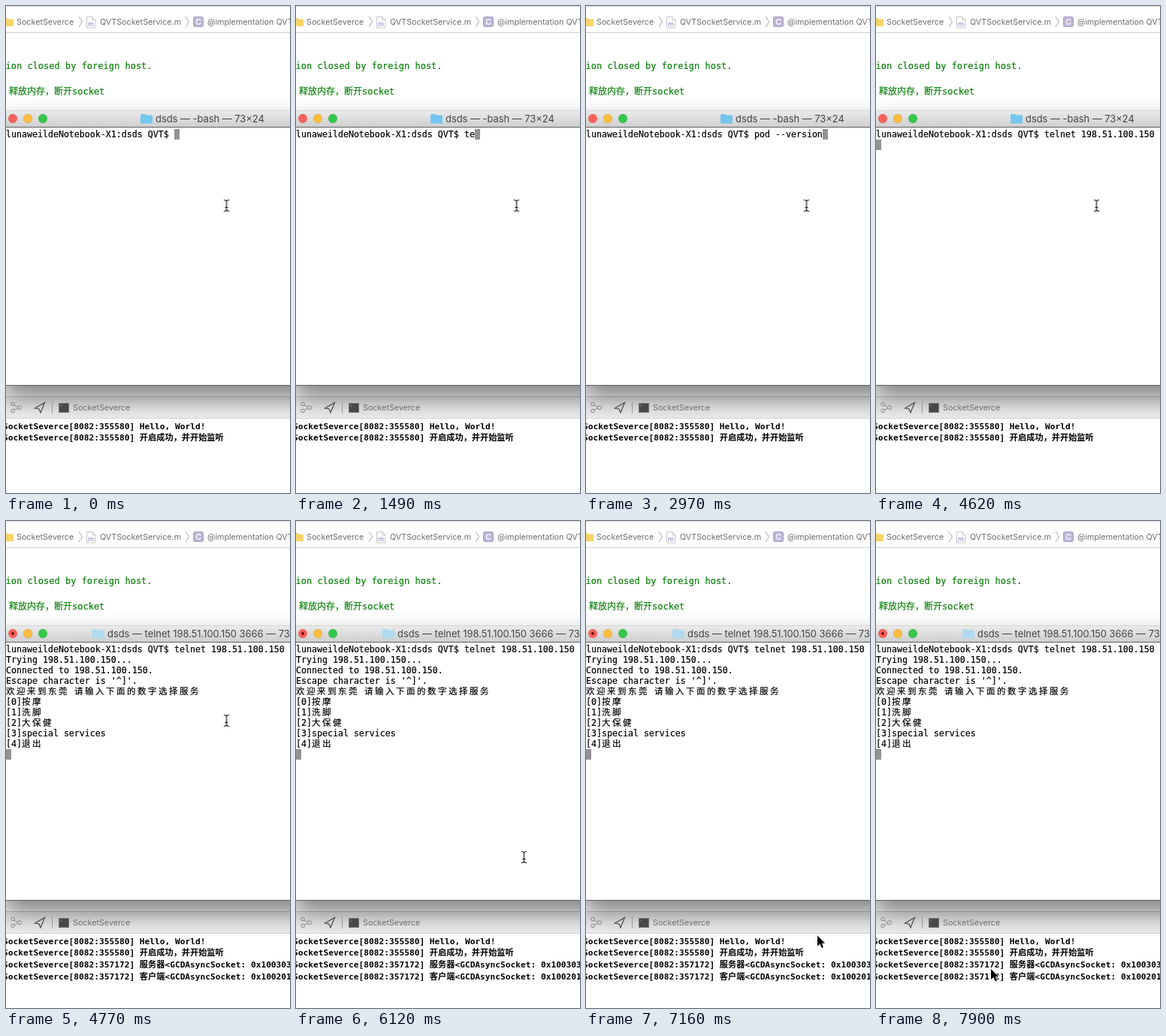
Write an HTML page that moves like this. It is 378 px wide and 649 px high and loops after 8000 ms.

```html
<!DOCTYPE html>
<html lang="zh-CN">
<head>
<meta charset="utf-8">
<title>Socket session</title>
<style>
html, body { margin: 0; width: 100%; height: 100%; overflow: hidden; background: #fff; }
svg { display: block; width: 378px; height: 649px; overflow: hidden; }
text { white-space: pre; }
.ui { font: 10.75px Inter, sans-serif; fill: #6e6e6e; }
.title { font: 12.9px Inter, sans-serif; fill: #444; }
.note { font: 12px "DejaVu Sans Mono", "Noto Sans CJK SC", monospace; fill: #0b800b; stroke: #0b800b; stroke-width: .2px; }
.log { font: bold 11.2px "DejaVu Sans Mono", "Noto Sans CJK SC", monospace; }
.term { font: 11.627px "DejaVu Sans Mono", monospace; stroke: #000; stroke-width: .2px; }
/* wide glyphs fill two 7px cells */
.zh { font: 11.5px "Noto Sans CJK SC", sans-serif; letter-spacing: 2.5px; }

.a { animation: 8s step-end infinite; }
.t { animation-name: t; }
.e { animation-name: e; }
.l { animation-name: l; }
.pod { animation-name: pod; }
.long { animation-name: long; }
.telnet { animation-name: telnet; }
.before { animation-name: before; }
.after { animation-name: after; }
.cursor { animation-name: cursor; }
.pointer { animation-name: pointer; }
.beam { animation-name: beam; }
.arrow { animation-name: arrow; }

@keyframes t { 0%, 22.375%, 100% { opacity: 0 } 9.375% { opacity: 1 } }
@keyframes e { 0%, 20.5%, 100% { opacity: 0 } 11.25% { opacity: 1 } }
@keyframes l { 0%, 18.625%, 100% { opacity: 0 } 13.125% { opacity: 1 } }
@keyframes long { 0%, 33.375%, 100% { opacity: 0 } 29.75% { opacity: 1 } }
@keyframes pod { 0%, 46.5%, 100% { opacity: 0 } 37.125% { opacity: 1 } }
@keyframes telnet {
  0%, 29.75%, 37.125% { opacity: 0 }
  27.875%, 33.375%, 46.5%, 100% { opacity: 1 }
}
@keyframes before { 0% { opacity: 1 } 59.625%, 100% { opacity: 0 } }
@keyframes after { 0% { opacity: 0 } 59.625%, 100% { opacity: 1 } }
@keyframes cursor {
  0%, 22.375% { transform: translate(224px, 164px) }
  9.375%, 20.5% { transform: translate(231px, 164px) }
  11.25%, 18.625% { transform: translate(238px, 164px) }
  13.125% { transform: translate(245px, 164px) }
  27.875%, 46.5% { transform: translate(406px, 164px) }
  37.125% { transform: translate(315px, 164px) }
  57.75% { transform: translate(0, 178px) }
  59.625%, 100% { transform: translate(0, 304px) }
}
@keyframes pointer {
  0% { transform: translate(293.5px, 266px) }
  76.5% { transform: translate(303.5px, 448px) }
  78.375% { transform: translate(334px, 488px) }
  80.25% { transform: translate(356px, 522px) }
  82.125% { transform: translate(358px, 536px) }
  83.875% { transform: translate(348px, 545px) }
  85.75% { transform: translate(331px, 550px) }
  87.625% { transform: translate(316px, 552px) }
  89.5% { transform: translate(308px, 552.5px) }
  91.375% { transform: translate(290px, 556px) }
  93.25% { transform: translate(250px, 568px) }
  95.125% { transform: translate(205px, 583px) }
  96.875% { transform: translate(170px, 594px) }
  98.75%, 100% { transform: translate(153px, 597px) }
}
@keyframes beam { 0% { opacity: 1 } 80.25%, 100% { opacity: 0 } }
@keyframes arrow { 0% { opacity: 0 } 80.25%, 100% { opacity: 1 } }
</style>
</head>
<body>
<svg viewBox="0 0 378 649">
  <defs>
    <linearGradient id="bar" x2="0" y2="1">
      <stop stop-color="#ebebeb"/><stop offset="1" stop-color="#cfcfcf"/>
    </linearGradient>
    <filter id="soft" filterUnits="userSpaceOnUse" x="-100" y="60" width="720" height="560" color-interpolation-filters="sRGB">
      <feGaussianBlur stdDeviation="17"/>
    </filter>
    <clipPath id="above"><rect y="120" width="378" height="430"/></clipPath>
    <path id="chev" d="M0 0L4.500 7L0 14" fill="none" stroke="#a8a8a8"/>
    <path id="folder" d="M0 2q0-1.500 1.500-1.500H6l1.500 1.500H15q1 0 1 1V12q0 1-1 1H1q-1 0-1-1Z"/>
  </defs>
  <rect width="378" height="649" fill="#fff"/>

  <!-- editor -->
  <path d="M0 .5H378" stroke="#e0e0e0"/>
  <path d="M0 35.500H378" stroke="#cfcfcf"/>
  <path d="M-4 16H2l1.500 1.500H9q1 0 1 1V26q0 1-1 1H-4Z" fill="#f7d468"/>
  <text class="ui" x="14" y="25">SocketSeverce</text>
  <use href="#chev" x="97" y="14"/>
  <path d="M107.500 14.500h7.500l4 4v10.500h-11.500ZM115 14.500v4h4" fill="#fff" stroke="#c4c4c4"/>
  <text x="109" y="27" font-family="Inter, sans-serif" font-size="9" font-weight="600" fill="#a99bc6">m</text>
  <text class="ui" x="125" y="25">QVTSocketService.m</text>
  <use href="#chev" x="239" y="14"/>
  <rect x="249.500" y="14.500" width="13" height="13" rx="2" fill="#bdb5d6" stroke="#a69cc4"/>
  <text x="252.200" y="25" font-family="Inter, sans-serif" font-size="10.500" font-weight="600" fill="#fff">C</text>
  <text class="ui" x="268" y="25">@implementation QVT</text>
  <text class="note" x="-.5" y="84">ion closed by foreign host.</text>
  <text class="note" x="4" y="118">释放内存，断开socket</text>

  <!-- debug bar -->
  <rect y="520" width="378" height="30" fill="#efefef"/>
  <path d="M0 520.500H378" stroke="#c8c8c8"/>
  <path d="M0 549.500H378" stroke="#d8d8d8"/>
  <g clip-path="url(#above)">
    <rect x="-5" y="157" width="525" height="366" opacity=".5" filter="url(#soft)"/>
  </g>
  <g fill="none" stroke="#858585">
    <path d="M11 532L15.500 534.500M11 538.500L15.500 536"/>
    <circle cx="9" cy="530.500" r="2.300"/><circle cx="9" cy="539.500" r="2.300"/><circle cx="18" cy="535.200" r="2.500"/>
  </g>
  <path d="M51.500 528.500L38.500 536L44 537L46 542Z" fill="none" stroke="#444" stroke-width="1.200"/>
  <path d="M61.500 527V543" stroke="#999"/>
  <rect x="70.500" y="529.500" width="13" height="12" fill="#484848" stroke="#747474"/>
  <path d="M72.500 531.500l1.500 1.200l-1.500 1.200" fill="none" stroke="#888"/>
  <text class="ui" x="89" y="539">SocketSeverce</text>

  <!-- console -->
  <g class="log">
    <text x="-4" y="564">SocketSeverce[8082:355580] Hello, World!</text>
    <text x="-4" y="579">SocketSeverce[8082:355580] 开启成功，并开始监听</text>
    <g class="a after">
      <text x="-4" y="595">SocketSeverce[8082:357172] 服务器&lt;GCDAsyncSocket: 0x100303</text>
      <text x="-4" y="611">SocketSeverce[8082:357172] 客户端&lt;GCDAsyncSocket: 0x100201</text>
    </g>
  </g>

  <!-- terminal window -->
  <rect y="139" width="378" height="366" fill="#fff"/>
  <rect y="139" width="378" height="22" fill="url(#bar)"/>
  <path d="M0 139.500H378" stroke="#d6d6d6"/>
  <path d="M0 161.500H378M0 505.500H378" stroke="#5f5f5f"/>
  <g stroke-opacity=".15" stroke="#000" stroke-width=".6">
    <circle cx="9" cy="150" r="5.900" fill="#fc605b"/>
    <circle cx="29" cy="150" r="5.900" fill="#fdbc40"/>
    <circle cx="49" cy="150" r="5.900" fill="#34c84a"/>
  </g>
  <g class="a before">
    <use href="#folder" x="179" y="143.500" fill="#72c6ef"/>
    <text class="title" x="199" y="155">dsds — -bash — 73×24</text>
  </g>
  <g class="a after">
    <circle cx="9" cy="150" r="1.900" fill="#6d0808"/>
    <use href="#folder" x="115" y="143.500" fill="#aedaf0"/>
    <text class="title" x="135" y="155">dsds — telnet 198.51.100.150 3666 — 73×24</text>
  </g>

  <g class="term">
    <text y="175">lunaweildeNotebook-X1:dsds QVT$</text>
    <text class="a t" x="224" y="175">t</text>
    <text class="a e" x="231" y="175">e</text>
    <text class="a l" x="238" y="175">l</text>
    <text class="a long" x="224" y="175">pod install --no-repo-update</text>
    <text class="a pod" x="224" y="175">pod --version</text>
    <text class="a telnet" x="224" y="175">telnet 198.51.100.150 3666</text>
    <g class="a after">
      <text y="189">Trying 198.51.100.150...</text>
      <text y="203">Connected to 198.51.100.150.</text>
      <text y="217">Escape character is '^]'.</text>
      <text y="231"><tspan class="zh">欢迎来到东莞</tspan> <tspan class="zh">请输入下面的数字选择服务</tspan></text>
      <text y="245">[0]<tspan class="zh">按摩</tspan></text>
      <text y="259">[1]<tspan class="zh">洗脚</tspan></text>
      <text y="273">[2]<tspan class="zh">大保健</tspan></text>
      <text y="287">[3]special services</text>
      <text y="301">[4]<tspan class="zh">退出</tspan></text>
    </g>
  </g>
  <rect class="a cursor" width="7" height="14" fill="#939393"/>

  <g class="a pointer">
    <path class="a beam" d="M-3.500-7.500Q0-7.500 0-5Q0-7.500 3.500-7.500M0-5.500V5.500M-3.500 7.500Q0 7.500 0 5Q0 7.500 3.500 7.500M-2 2.500H2" fill="none" stroke="#111" stroke-width="1.200"/>
    <path class="a arrow" d="M0 0V14L3.300 11L5.800 16.500L8 15.500L5.700 10.200H10.200Z" stroke="#fff" stroke-width="1.600" paint-order="stroke"/>
  </g>
</svg>
</body>
</html>
```
